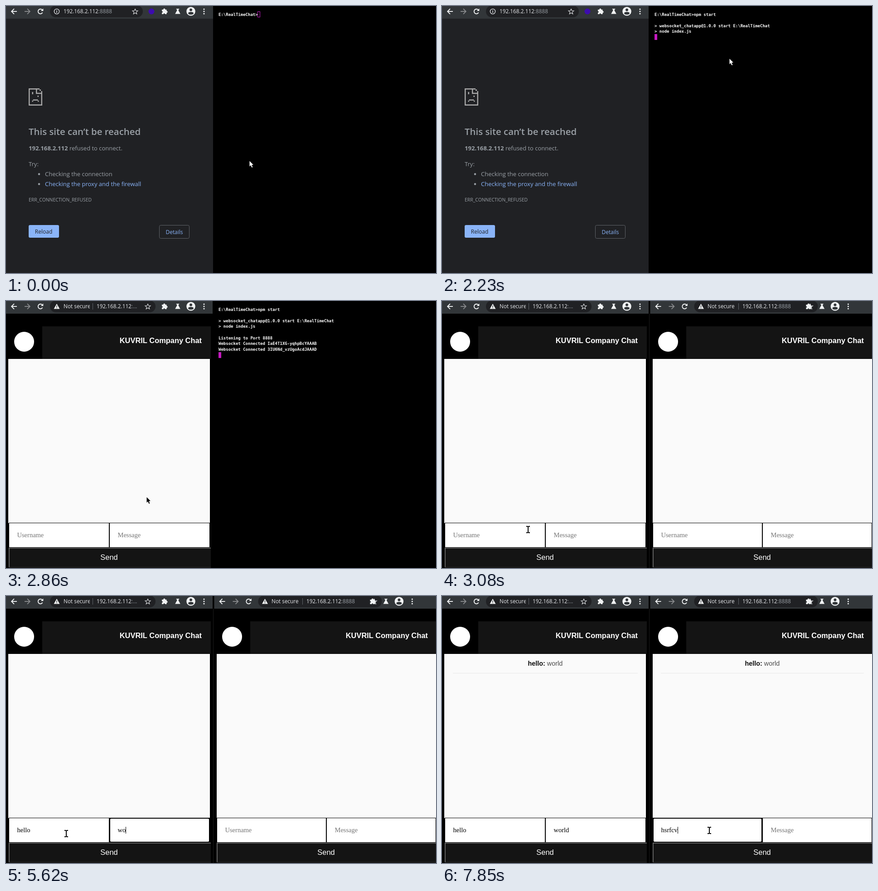
An HTML page with a canvas that plays this animation: 949x590 px, repeating every 8 s.

```html
<!DOCTYPE html>
<html lang="en">
<head>
<meta charset="utf-8">
<title>Chat demo</title>
<style>
html, body { margin: 0; width: 100%; height: 100%; overflow: hidden; background: #000; }
canvas { display: block; width: 949px; height: 590px; }
</style>
</head>
<body>
<canvas id="stage" width="949" height="590"></canvas>
<script>
const ctx = document.getElementById('stage').getContext('2d');
const LOOP = 8000;
const UI = '"Open Sans", "Noto Sans", sans-serif';
const SANS = '"Liberation Sans", Arial, sans-serif';
const SERIF = '"Liberation Serif", "Times New Roman", serif';
const MONO = '"DejaVu Sans Mono", monospace';
const BAR_FONT = '11.8px ' + UI, BODY_FONT = '13px ' + UI;
const DARK = '#202124', BAR = '#323639', GREY = '#9aa0a6', BLUE = '#8ab4f8';

// Pointer steps: time, x, y, shape
const POINTER = [
  [0, 537, 342, 'light'], [70, 552, 310, 'light'], [140, 585, 230, 'light'],
  [210, 624, 150, 'light'], [380, 632, 122, 'light'], [530, 634, 116, 'light'],
  [2400, 560, 200, 'light'], [2480, 470, 290, 'light'], [2550, 400, 360, 'dark'],
  [2620, 345, 410, 'dark'], [2760, 310, 433, 'dark'], [3000, 265, 460, 'dark'],
  [3070, 190, 505, 'beam'], [3210, 133, 525, 'beam'], [6390, 145, 530, 'beam'],
  [6460, 170, 540, 'beam'], [6530, 198, 553, 'light'], [6610, 210, 558, 'light'],
  [6900, 250, 555, 'light'], [6970, 330, 548, 'light'], [7040, 420, 535, 'beam'],
  [7110, 510, 525, 'beam'], [7180, 570, 520, 'beam'], [7260, 590, 518, 'beam']
];
const USER = [[0, ''], [3660, 'h'], [3830, 'he'], [4070, 'hel'], [4440, 'hello']];
const WORD = [[0, ''], [5140, 'w'], [5620, 'wo'], [5850, 'wor'], [6000, 'worl'], [6140, 'world']];
const GUEST = [[0, ''], [7400, 'h'], [7470, 'hs'], [7540, 'hsr'], [7700, 'hsrf'], [7770, 'hsrfc'], [7850, 'hsrfcv']];

const at = (steps, t) => steps.filter(s => s[0] <= t).pop();

function box(x, y, w, h, fill) {
  ctx.fillStyle = fill;
  ctx.fillRect(x, y, w, h);
}

function round(x, y, w, h, r) {
  ctx.beginPath();
  ctx.roundRect(x, y, w, h, r);
}

function text(str, x, y, font, fill, align = 'left') {
  ctx.font = font;
  ctx.fillStyle = fill;
  ctx.textAlign = align;
  ctx.fillText(str, x, y);
  return ctx.measureText(str).width;
}

function line(points, color, width) {
  ctx.strokeStyle = color;
  ctx.lineWidth = width;
  ctx.beginPath();
  points.forEach(([x, y]) => ctx.lineTo(x, y));
  ctx.stroke();
}

function poly(points, fill) {
  ctx.fillStyle = fill;
  ctx.beginPath();
  points.forEach(([x, y]) => ctx.lineTo(x, y));
  ctx.closePath();
  ctx.fill();
}

function disc(x, y, r, fill) {
  ctx.fillStyle = fill;
  ctx.beginPath();
  ctx.arc(x, y, r, 0, Math.PI * 2);
  ctx.fill();
}

function ring(x, y, r, color, width, from = 0, to = Math.PI * 2) {
  ctx.strokeStyle = color;
  ctx.lineWidth = width;
  ctx.beginPath();
  ctx.arc(x, y, r, from, to);
  ctx.stroke();
}

function arrow(x, dir, color) {
  line([[x - 6 * dir, 12], [x + 6 * dir, 12]], color, 1.9);
  line([[x, 6.2], [x + 5.8 * dir, 12], [x, 17.8]], color, 1.9);
}

function reload(x) {
  ring(x, 12, 5.2, '#f1f3f4', 1.9, 0.5, 5.5);
  poly([[x + 6.3, 5.5], [x + 6.3, 11], [x + 0.8, 11]], '#f1f3f4');
}

function cross(x) {
  line([[x - 5, 7], [x + 5, 17]], '#f1f3f4', 1.9);
  line([[x + 5, 7], [x - 5, 17]], '#f1f3f4', 1.9);
}

function info(x) {
  ring(x, 12, 5.6, '#dfe1e5', 1.4);
  box(x - 0.8, 11, 1.6, 4, '#dfe1e5');
  box(x - 0.8, 8.6, 1.6, 1.5, '#dfe1e5');
}

function warning(x) {
  poly([[x, 6], [x + 6.5, 17.5], [x - 6.5, 17.5]], '#f1f3f4');
  box(x - 0.7, 10, 1.4, 3.6, DARK);
  box(x - 0.7, 14.6, 1.4, 1.4, DARK);
}

function star(x) {
  const pts = [];
  for (let i = 0; i <= 10; i++) {
    const r = i % 2 ? 2.8 : 6.3, a = -Math.PI / 2 + i * Math.PI / 5;
    pts.push([x + r * Math.cos(a), 12.5 + r * Math.sin(a)]);
  }
  line(pts, '#d5d7da', 1.2);
}

function puzzle(x) {
  box(x - 6, 8, 10.5, 10, '#f1f3f4');
  disc(x - 0.7, 7.6, 2.1, '#f1f3f4');
  disc(x + 4.6, 13, 2.1, '#f1f3f4');
  disc(x - 6, 13, 1.8, BAR);
  disc(x - 0.7, 18, 1.8, BAR);
}

function flask(x) {
  box(x - 3.2, 6, 6.4, 1.5, '#f1f3f4');
  poly([[x - 1.7, 6.5], [x + 1.7, 6.5], [x + 1.7, 10], [x + 5.8, 17.6], [x - 5.8, 17.6], [x - 1.7, 10]], '#f1f3f4');
}

function avatar(x) {
  disc(x, 11.8, 9.8, '#f1f3f4');
  disc(x, 8.4, 3, BAR);
  ctx.fillStyle = BAR;
  ctx.beginPath();
  ctx.ellipse(x, 16, 6, 3.1, 0, 0, Math.PI * 2);
  ctx.fill();
}

function toolbar(x, w, pillW, state) {
  box(x, 0, w, 28, BAR);
  arrow(x + 18, -1, '#f1f3f4');
  arrow(x + 47, 1, '#87898c');
  (state === 'loading' ? cross : reload)(x + 76);
  ctx.fillStyle = DARK;
  round(x + 97, -1, pillW, 26, 13);
  ctx.fill();
  (state === 'error' ? info : warning)(x + 112);
  star(x + 97 + pillW - 17);
  puzzle(x + 350);
  flask(x + 379);
  avatar(x + 408);
  [7, 12, 17].forEach(y => disc(x + 437, y, 1.6, '#f1f3f4'));
}

function address(x, port) {
  const w = text('192.168.2.112', x, 16.3, BAR_FONT, '#e8eaed');
  text(port, x + w, 16.3, BAR_FONT, GREY);
}

function secureLabel(x, clip) {
  ctx.save();
  ctx.beginPath();
  ctx.rect(x, 0, clip, 28);
  ctx.clip();
  text('Not secure', x, 16.3, BAR_FONT, '#e8eaed');
  ctx.restore();
}

function sadPage() {
  const c = '#a9a9a9';
  line([[74, 183.2], [51.2, 183.2], [51.2, 218.8], [78.8, 218.8], [78.8, 188]], c, 2.4);
  line([[67.2, 182], [67.2, 193], [80, 193]], c, 2.4);
  box(74, 184.4, 3, 3, c);
  box(57.5, 190, 2.5, 5, c);
  box(69.5, 198, 2.5, 3, c);
  box(59.5, 206.5, 11, 2.4, c);
  box(57.5, 209, 2.5, 2.5, c);
  box(70, 209, 2.5, 2.5, c);
}

function errorPage(w) {
  box(0, 28, w, 562, DARK);
  sadPage();
  text('This site can’t be reached', 50, 284.5, '600 20.4px ' + UI, GREY);
  const lead = text('192.168.2.112', 50, 318.5, '700 13.2px ' + UI, GREY);
  text(' refused to connect.', 50 + lead, 318.5, BODY_FONT, GREY);
  text('Try:', 50, 354, BODY_FONT, GREY);
  disc(73, 371.5, 2.2, GREY);
  disc(73, 393.5, 2.2, GREY);
  text('Checking the connection', 86, 375.5, BODY_FONT, GREY);
  text('Checking the proxy and the firewall', 86, 397.5, BODY_FONT, BLUE);
  text('ERR_CONNECTION_REFUSED', 50, 431.5, '10.4px ' + UI, GREY);
  ctx.fillStyle = BLUE;
  round(50, 484, 67, 28, 3);
  ctx.fill();
  text('Reload', 83, 502.5, '12px ' + UI, DARK, 'center');
  ctx.strokeStyle = '#5f6368';
  ctx.lineWidth = 1;
  round(338.5, 484.5, 66, 29, 3);
  ctx.stroke();
  text('Details', 371.5, 503.5, '12px ' + UI, BLUE, 'center');
}

function terminal(t) {
  const y = row => 21.5 + row * 12.6;
  const font = 'bold 9px ' + MONO;
  const put = (str, row) => text(str, 469, Math.round(y(row)), font, '#fff');
  box(457, 0, 492, 590, '#000');
  put('E:\\RealTimeChat>' + (t >= 1390 ? 'npm start' : ''), 0);
  if (t >= 2150) {
    put('> websocket_chatapp@1.0.0 start E:\\RealTimeChat', 2);
    put('> node index.js', 3);
  }
  if (t >= 2240) {
    put('Listening to Port 8888', 5);
    put('Websocket Connected IaE4T1XG-yqhpBcYAAAB', 6);
  }
  if (t >= 2550) put('Websocket Connected 3IU6Nd_vzUgoAcdJAAAD', 7);
  const [, row, col] = at([[0, 0, 16], [1390, 0, 25], [1680, 1, 0], [2150, 4, 0], [2240, 7, 0], [2550, 8, 0]], t);
  const x = Math.floor(469 + col * 5.42), top = Math.round(y(row) - 9.5);
  if (t < 530) {
    ctx.strokeStyle = '#c31bc3';
    ctx.lineWidth = 1;
    ctx.strokeRect(x + 0.5, top + 0.5, 5, 12);
  } else {
    box(x, top, 6, 13, '#c519c0');
  }
}

function field(x, w, label, value, focus) {
  box(x, 490, w, 55, '#000');
  box(x + 1, 491, w - 2, 53, '#fff');
  if (focus) {
    ctx.strokeStyle = '#000';
    ctx.lineWidth = 2;
    round(x + 1, 491, w - 2, 53, 3);
    ctx.stroke();
  }
  const width = text(value || label, x + 18.5, 522, '14.5px ' + SERIF, value ? '#000' : '#757575');
  if (focus) box(Math.round(x + 18.5 + (value ? width : 0)), 510, 1, 15, '#000');
}

function chat(x, w, half, user, word, focus, sent) {
  const mid = x + half;
  box(x, 56, w + 1, 71.5, '#141414');
  box(x, 56, 74, 71.5, '#000');
  disc(x + 34, 90, 22, '#fff');
  text('KUVRIL Company Chat', x + half * 2 - 18, 93, 'bold 16.4px ' + SANS, '#fff', 'right');
  box(x - (x < 10 ? 1 : 0), 128, w, 363, '#fafafa');
  if (sent) {
    const left = mid - 38.5;
    const n = text('hello:', left, 154, 'bold 14.4px ' + SANS, '#0c0c0c');
    text(' world', left + n, 154, '14.4px ' + SANS, '#4a4a4a');
    box(x + 18, 170, half * 2 - 36, 1, '#e8e8e8');
  }
  field(x, half, 'Username', user, focus === 1);
  field(mid, half, 'Message', word, focus === 2);
  box(x, 545, w + 1, 44, '#141414');
  box(x, 545, w + 1, 1.6, '#767676');
  box(x, 545, 1.6, 44, '#767676');
  box(x, 588, w + 1, 1, '#303030');
  text('Send', mid - 0.5, 572, '16.4px ' + SANS, '#fff', 'center');
}

function pointer(x, y, kind) {
  if (kind === 'beam') {
    [-1, 1].forEach(s => line([
      [x + 4 * s, y - 7], [x + 1.5 * s, y - 7], [x, y - 6],
      [x, y + 6], [x + 1.5 * s, y + 7], [x + 4 * s, y + 7]
    ], '#000', 1.8));
    return;
  }
  poly([[0, 0], [0, 12], [2.7, 9.5], [5, 14.5], [6.9, 13.7], [4.8, 8.8], [8.4, 8.5]]
    .map(([a, b]) => [x + a + 0.5, y + b + 0.5]), kind === 'light' ? '#fff' : '#000');
}

function left(t) {
  const w = t < 530 ? 458 : 456;
  const state = t < 2320 ? 'error' : t < 2480 ? 'loading' : 'chat';
  box(0, 28, w, 562, state === 'chat' ? '#000' : BAR);
  toolbar(0, w, state === 'chat' ? 233 : 205, state);
  if (state === 'chat') {
    secureLabel(127, 58);
    box(191, 5, 1, 14, '#5f6368');
    address(200, ':...');
    const focus = t < 3370 ? 0 : t < 4900 ? 1 : t < 7330 ? 2 : 0;
    chat(6, 445, 222, at(USER, t)[1], at(WORD, t)[1], focus, t >= 6830);
    return;
  }
  disc(321, 12, 6.5, '#3d0cae');
  address(127, ':8888');
  if (state === 'error') {
    errorPage(w);
  } else {
    box(0, 28, w, 1, '#28292c');
    box(133, 5, 1, 14, '#dfe1e5');
  }
}

function right(t) {
  box(456, 0, 493, 590, '#000');
  box(457, 28, 1, 562, '#1c1c1c');
  toolbar(459.5, 489.5, 273, 'chat');
  secureLabel(586, 64);
  box(654, 5, 1, 14, '#5f6368');
  address(663, ':8888');
  chat(465, 484, 242, at(GUEST, t)[1], '', t >= 7330 ? 1 : 0, t >= 6830);
}

function draw(t) {
  box(0, 0, 949, 590, '#000');
  left(t);
  if (t < 3000) terminal(t); else right(t);
  const [, x, y, kind] = at(POINTER, t);
  pointer(x, y, kind);
}

const start = performance.now();
function tick() {
  draw((performance.now() - start) % LOOP);
  requestAnimationFrame(tick);
}
tick();
</script>
</body>
</html>
```
